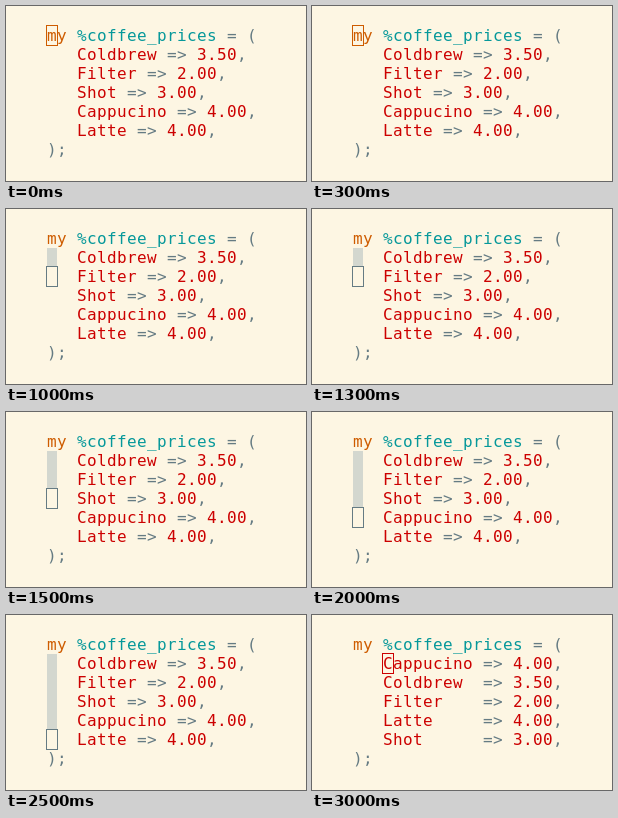
Write an HTML page that moves like this. It is 300 px wide and 175 px high and loops after 3500 ms.

```html
<!DOCTYPE html>
<html lang="en">
<head>
<meta charset="utf-8">
<title>Sorting a hash</title>
<style>
  html, body { margin: 0; width: 100%; height: 100%; overflow: hidden; background: #fdf6e3; }
  pre, #selection, #cursor { position: absolute; margin: 0; }
  pre {
    left: 41px; top: 20px;
    font: 16px/19px "DejaVu Sans Mono", monospace;
    letter-spacing: calc(10px - 1ch);
    color: #657b83;
  }
  .keyword { color: #ce5c00; }
  .variable { color: #06989a; }
  .value { color: #cc0000; }
  #selection { left: 41px; top: 39px; width: 10px; background: #d3d7cf; }
  #cursor { box-sizing: border-box; width: 12px; height: 21px; border: 1px solid; }
</style>
</head>
<body>
<div id="selection"></div>
<pre id="code"></pre>
<div id="cursor"></div>
<script>
const STEP = 500, STEPS = 7, CELL_W = 10, CELL_H = 19, LEFT = 41, TOP = 20;
const prices = [
  ['Coldbrew', '3.50'], ['Filter', '2.00'], ['Shot', '3.00'],
  ['Cappucino', '4.00'], ['Latte', '4.00'],
];
const [selection, code, cursor] = ['selection', 'code', 'cursor'].map(id => document.getElementById(id));

const span = (kind, text) => `<span class="${kind}">${text}</span>`;

function listing(items, pad) {
  const rows = items.map(([name, price]) =>
    `   ${span('value', name.padEnd(pad))} =&gt; ${span('value', price)},`);
  return [`${span('keyword', 'my')} ${span('variable', '%coffee_prices')} = (`, ...rows, ');'].join('\n');
}

const unsorted = listing(prices, 0);
const sorted = listing([...prices].sort((a, b) => a[0] < b[0] ? -1 : 1), 9);

function placeCursor(col, row, color) {
  cursor.style.left = LEFT + col * CELL_W - 1 + 'px';
  cursor.style.top = TOP + row * CELL_H - 1 + 'px';
  cursor.style.borderColor = color;
}

function show(step) {
  const done = step === STEPS - 1;
  code.innerHTML = done ? sorted : unsorted;
  selection.style.height = (done ? 0 : Math.max(0, step - 1) * CELL_H) + 'px';
  if (done) placeCursor(3, 1, '#cc0000');
  else placeCursor(0, step, step ? '#657b83' : '#ce5c00');
}

let shown = -1;
function tick() {
  const step = Math.floor(performance.now() / STEP) % STEPS;
  if (step !== shown) show(shown = step);
  requestAnimationFrame(tick);
}
tick();
</script>
</body>
</html>
```
